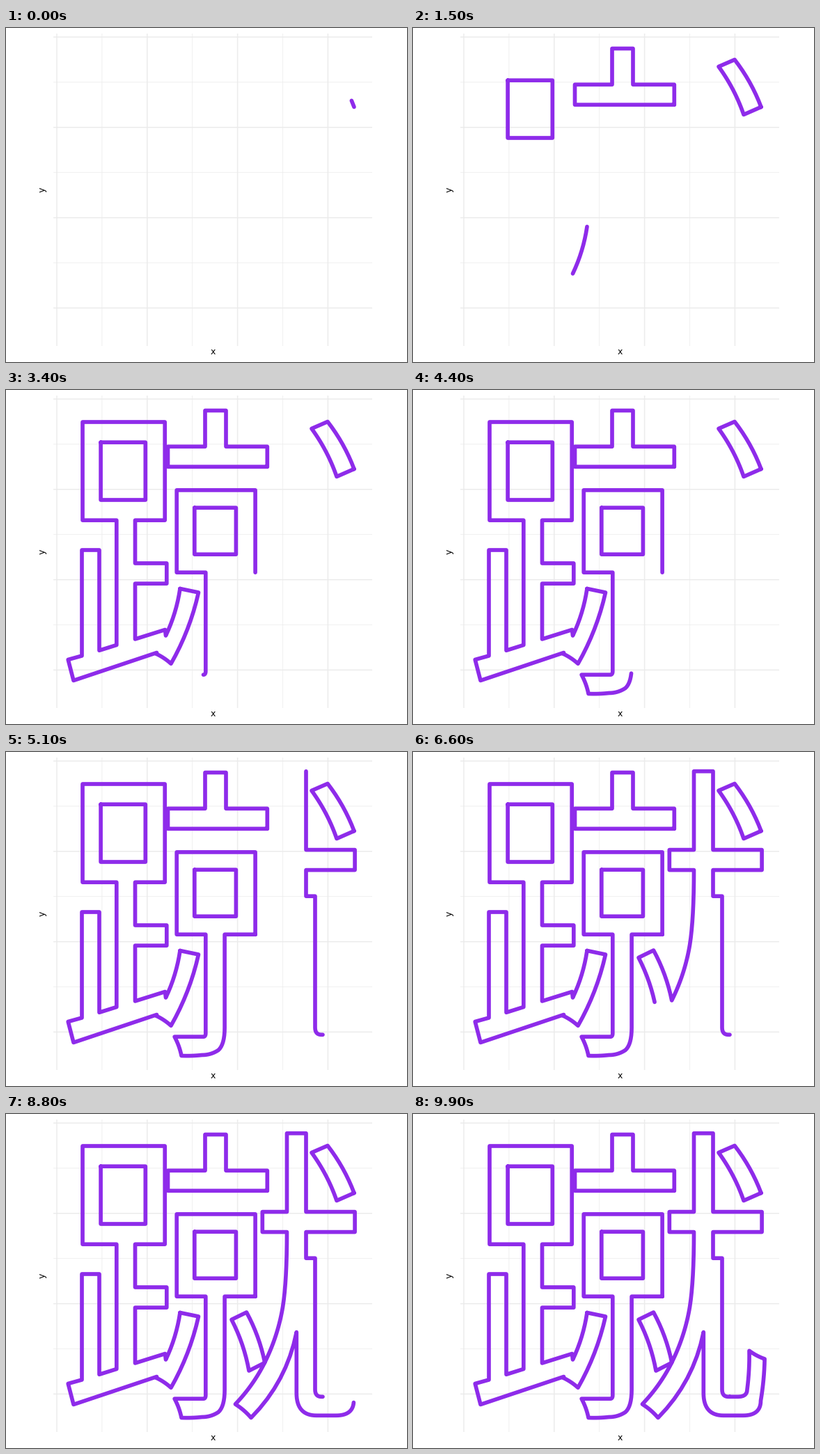
A matplotlib script for the animation above (10 s loop, 576 by 480 pixels).

```python
import matplotlib.pyplot as plt
import numpy as np
from matplotlib.animation import FuncAnimation

W, H, DPI = 576, 480, 72
FRAMES, INTERVAL = 100, 100
STEPS = 8      # rows per ordinary curve
SAG = 0.075    # how far an ordinary curve bows, relative to its chord

plt.rcParams["path.simplify"] = False
plt.rcParams["font.family"] = "DejaVu Sans"


class Pen:
    """Collects the points of one outline; each point is one row in time."""

    def __init__(self, x, y):
        self.pts = [np.array([x, y], float)]

    def line(self, x, y):
        self.pts.append(np.array([x, y], float))
        return self

    def zigzag(self, axis, stops):
        for value in stops:
            p = self.pts[-1].copy()
            p[axis] = value
            self.pts.append(p)
            axis = 1 - axis
        return self

    def hv(self, *stops):
        return self.zigzag(0, stops)

    def vh(self, *stops):
        return self.zigzag(1, stops)

    def curve(self, cx, cy, x, y, steps=STEPS):
        a, c, b = self.pts[-1], np.array([cx, cy]), np.array([x, y])
        for t in np.arange(1, steps + 1) / steps:
            self.pts.append((1 - t) ** 2 * a + 2 * t * (1 - t) * c + t * t * b)
        return self

    def bend(self, x, y, sag=SAG, steps=STEPS):
        """Symmetric arc; a negative sag bows to the other side."""
        ax, ay = self.pts[-1]
        return self.curve((ax + x) / 2 - sag * (y - ay),
                          (ay + y) / 2 + sag * (x - ax), x, y, steps)

    def corner(self, x, y, steps=STEPS):
        """Quarter turn that leaves along the last direction."""
        (ax, ay), (dx, dy) = self.pts[-1], np.abs(self.pts[-1] - self.pts[-2])
        c = (ax, y) if dy > dx else (x, ay)
        return self.curve(*c, x, y, steps)


def box(x0, y0, x1, y1):
    return Pen(x0, y0).hv(x1, y1, x0, y0)


dot = (Pen(500, 113.5).bend(462, 45.5).line(439, 55.5)
       .bend(475, 124.5, -SAG, 14).line(500, 113.5))

lid = Pen(375.3, 110.3).vh(81.3, 316, 29.5, 286, 81.3, 232.5, 110.3, 375.3)

foot = (Pen(250, 285.5).bend(229.5, 353, -SAG)
        .line(228.5, 344.5).line(185.5, 358)
        .vh(278.2, 230.8, 249, 185.5, 187.2, 228.2, 46, 110, 187.2, 158.8, 366.5)
        .line(134, 374.3).vh(230, 109, 382)
        .line(89.2, 387.5).line(97, 417.5).line(216.5, 377.5).line(215.5, 379)
        .bend(237, 393.3, -SAG).bend(276.5, 291).line(250, 285.5))

stem = (Pen(358.1, 262.2).vh(143.9, 245.2, 262.2, 286.8, 404)
        .corner(283.5, 409.2).hv(242.1).bend(252, 436.5, -SAG)
        .bend(281.5, 435.5, SAG / 2).bend(305, 428.5, 2 * SAG)
        .curve(314.1, 420.5, 314.1, 396).vh(262.2, 358.1))

hook = (Pen(455, 406.3).hv(453).corner(444, 396)
        .vh(207.2, 431, 169.6, 501.1, 140.6, 431, 27.7, 403.5, 140.6, 368.3, 169.6, 403.5)
        .curve(403.5, 240, 397.6, 277).bend(371.7, 357, -SAG, 17)
        .bend(345.5, 285).line(324, 295.5).bend(349, 369, -SAG).line(371.5, 357.5)
        .bend(329.4, 417, -SAG, 2 * STEPS).bend(352, 436.5, -SAG)
        .bend(417.3, 313.5, 2 * SAG).vh(401)
        .corner(446, 433.3, 2 * STEPS).hv(474)
        .corner(499.5, 412, 2 * STEPS).bend(505.1, 352, SAG / 2)
        .bend(483, 340.3, -SAG).bend(480, 396, -SAG / 2)
        .corner(467, 406.3, 6).hv(455))

outlines = [dot, lid, box(136.1, 75.2, 200.3, 158), foot,
            box(270.8, 169.2, 330.4, 236.2), stem, hook]

# A gap row after each outline lifts the pen and takes no time.
points = np.vstack([p for o in outlines for p in (*o.pts, [np.nan] * 2)])
rows = np.cumsum(~np.isnan(points[:, 0])) - 1
rate = rows[-1] / (FRAMES - 1)

fig = plt.figure(figsize=(W / DPI, H / DPI), dpi=DPI, facecolor="white")
ax = fig.add_axes([0, 0, 1, 1])
ax.set(xlim=(0, W), ylim=(H, 0))
ax.axis("off")

LEFT, RIGHT, TOP, BOTTOM, GAP = 68, 526, 8, 457, 64.9
for i in range(7):
    style = dict(color="#EBEBEB", lw=0.71 if i % 2 else 1.42,
                 solid_capstyle="butt", snap=False, zorder=1 - i % 2)
    x, y = 73 + i * GAP, 13 + i * GAP
    ax.plot([x, x], [TOP, BOTTOM], **style)
    ax.plot([LEFT, RIGHT], [y, y], **style)

ax.text(297.3, 468.7, "x", size=12.5, ha="center", va="baseline")
ax.text(59, 232, "y", size=12.5, ha="right", va="center", rotation=90)

ink, = ax.plot([], [], color="#8E2BEA", lw=5.67, solid_capstyle="round",
               solid_joinstyle="round", snap=False, zorder=3)


def update(i):
    shown = points[rows <= int((i + 0.5) * rate)]
    ink.set_data(shown[:, 0], shown[:, 1])
    return ink,


anim = FuncAnimation(fig, update, frames=FRAMES, interval=INTERVAL,
                     repeat=True, repeat_delay=0)
plt.show()
```
